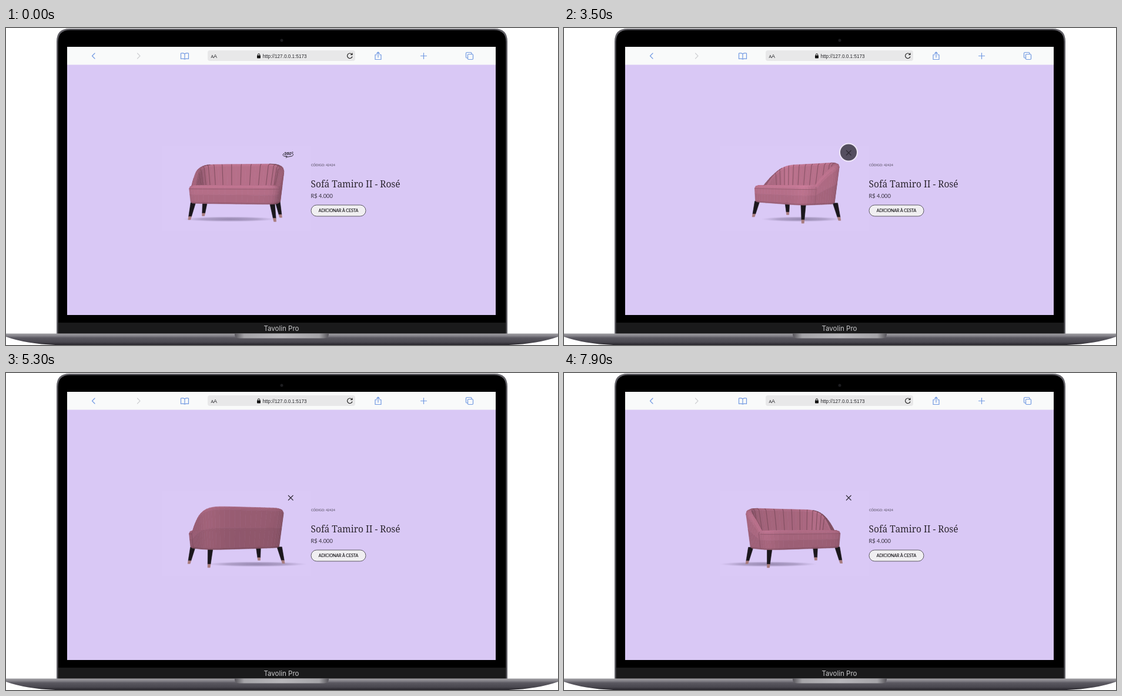
Animation of 939x539 px, one loop 8 s. Source, as an HTML page with a canvas:

```html
<!DOCTYPE html>
<html lang="pt-BR">
<head>
<meta charset="utf-8">
<title>Sofá 360°</title>
<style>
html, body { margin: 0; width: 100%; height: 100%; overflow: hidden; background: #fff; }
svg, canvas { position: absolute; left: 0; top: 0; width: 939px; height: 539px; }
.blue { fill: none; stroke: #7199e2; stroke-width: 1.2; stroke-linecap: round; stroke-linejoin: round; }
.sans { font-family: "Liberation Sans", sans-serif; }
.lato { font-family: Lato, sans-serif; }
</style>
</head>
<body>
<svg viewBox="0 0 939 539">
  <defs>
    <linearGradient id="base" x1="0" y1="0" x2="0" y2="1">
      <stop offset="0" stop-color="#a09fa3"/><stop offset=".2" stop-color="#85838a"/>
      <stop offset=".38" stop-color="#5a5860"/><stop offset=".75" stop-color="#49474f"/>
      <stop offset="1" stop-color="#252329"/>
    </linearGradient>
    <linearGradient id="notch">
      <stop offset="0" stop-color="#56545a"/><stop offset=".1" stop-color="#a5a4a8"/>
      <stop offset=".5" stop-color="#b7b6ba"/><stop offset=".9" stop-color="#a5a4a8"/>
      <stop offset="1" stop-color="#56545a"/>
    </linearGradient>
  </defs>

  <path d="M86 520V23Q86 1 108 1H831Q853 1 853 23V520Z" fill="#626167"/>
  <path d="M88.500 520V24Q88.500 3.500 109 3.500H830Q850.500 3.500 850.500 24V520Z" fill="#000"/>
  <rect x="89" y="501" width="761" height="19" fill="#1a1a1b"/>
  <circle cx="469" cy="21" r="2.500" fill="#1d1d20"/>
  <text x="468.500" y="515" text-anchor="middle" font-size="11.500" fill="#c9c9cb" font-family="Inter, sans-serif">Tavolin Pro</text>
  <path d="M0 519.500H939V525Q905 537 855 539H84Q34 537 0 525Z" fill="url(#base)"/>
  <path d="M389 519.500H549V521Q549 527.500 541 527.500H397Q389 527.500 389 521Z" fill="url(#notch)"/>

  <rect x="104" y="32" width="729" height="456" fill="#d9c8f5"/>
  <rect x="265" y="200" width="254" height="146" fill="#dac9f6"/>
  <rect x="104" y="32" width="729" height="30.500" fill="#f9fafa"/>
  <rect x="343" y="38" width="251" height="18" rx="4" fill="#e8e8e9"/>

  <g class="blue">
    <path d="M151 43L146.500 47.500L151 52"/>
    <path d="M223.500 43L228 47.500L223.500 52" stroke="#d0d0d3"/>
    <path d="M304 44Q301 42 297.500 43V52.500Q301 51.500 304 53Q307 51.500 310.500 52.500V43Q307 42 304 44V53"/>
    <path d="M630.500 45.500H628V53.500H638V45.500H635.500M633 50V41M630.500 43.500L633 41L635.500 43.500"/>
    <path d="M705.500 47.500H715.500M710.500 42.500V52.500"/>
    <rect x="785.500" y="44.500" width="9" height="9" rx="1.500"/>
    <path d="M785.500 51H784Q782.500 51 782.500 49.500V43Q782.500 41.500 784 41.500H790.500Q792 41.500 792 43V44.500"/>
  </g>

  <g class="sans" fill="#2a2a2e">
    <text x="348.500" y="51" font-size="7">A</text>
    <text x="353" y="51" font-size="9">A</text>
    <text x="436.500" y="51" font-size="8.200">http://127.0.0.1:5173</text>
    <rect x="427" y="46.500" width="6" height="5" rx=".8" fill="#111"/>
    <path d="M428.300 47V45.500A1.700 1.700 0 0 1 431.700 45.500V47" fill="none" stroke="#111"/>
  </g>
  <path d="M588.500 45A4.300 4.300 0 1 0 589 48.500M589 42.500V45.500H586" fill="none" stroke="#222" stroke-width="1.200"/>

  <text x="519" y="235" class="lato" font-size="5.500" fill="#4b4455">CÓDIGO: 42424</text>
  <text x="518.500" y="271" font-family="Noto Serif, serif" font-weight="500" font-size="15.500" fill="#2c2630">Sofá Tamiro II - Rosé</text>
  <text x="518.500" y="289" class="lato" font-size="9.300" fill="#37313f">R$ 4.000</text>
  <rect x="519" y="301" width="93" height="19" rx="9.500" fill="#f0eff1" stroke="#5d5964"/>
  <text x="565.500" y="313" text-anchor="middle" class="lato" font-size="7" fill="#17151a" stroke="#17151a" stroke-width=".15">ADICIONAR À CESTA</text>

  <g id="disc">
    <circle cx="484" cy="211.500" r="15" fill="#544e5f" stroke="#f0e9fb" stroke-width="2"/>
  </g>
  <g id="spin" fill="none" stroke="#2b2731">
    <text x="473" y="216" class="sans" font-size="7.500" font-weight="bold" font-style="italic" fill="#2b2731" stroke="none">360°</text>
    <path d="M473.500 213Q469 215.500 472.500 217.700Q479 220.500 486 218Q491 215.500 486.500 213M476 217L478.500 219L476 221"/>
  </g>
  <path id="cross" d="M480 208L488.500 216.500M488.500 208L480 216.500" stroke="#2c2833" stroke-width="1.100"/>
</svg>
<canvas width="939" height="539"></canvas>

<script>
const LOOP = 8000, CX = 392, HORIZON = 261, DIST = 700;
const BASE = 36, SEAT = 7, TOP = -31, FLOOR = 63;
const SIDE = 16, N = SIDE * 4;
const ctx = document.querySelector('canvas').getContext('2d');
const $ = id => document.getElementById(id);

// time, turn in degrees, brightness, shadow left, shadow right
const KEYS = [
  [2900, 13, .96, 300, 460],
  [4000, 86, 1.04, 365, 482],
  [4700, 124, .96, 350, 512],
  [5000, 139.5, .9, 345, 512],
  [5100, 139.5, .9, 345, 512],
  [6000, 186, .72, 328, 510],
  [6800, 275, .8, 283, 422],
  [7200, 296, .85, 276, 426],
  [7300, 296, .85, 276, 426],
  [7900, 328, .94, 265, 430]
];

function pose(t) {
  const i = KEYS.findIndex(k => k[0] >= t);
  if (i < 0) return KEYS[KEYS.length - 1];
  if (i === 0) return KEYS[0];
  const a = KEYS[i - 1], b = KEYS[i], f = (t - a[0]) / (b[0] - a[0]);
  return a.map((v, j) => v + (b[j] - v) * f);
}

// Rounded square outline, evenly spaced
const outline = Array.from({ length: N }, (_, i) => {
  const f = (i % SIDE) / SIDE * 2 - 1;
  const [x, z] = [[1, f], [-f, 1], [-1, -f], [f, -1]][i / SIDE | 0];
  const n = z > 0 ? 4 : 6;
  const r = (Math.abs(x) ** n + Math.abs(z) ** n) ** (-1 / n);
  return [x * r, z * r];
});

// Height of the arm and back along the outline
function crest(z) {
  const t = Math.min(1, Math.max(0, (z * 45 + 17) / 60));
  return SEAT + (TOP - SEAT) * (1 - (1 - t) ** 1.4);
}

function shellPoint([qx, qz], y, inset) {
  const k = (BASE - y) / (BASE - TOP);
  const depth = qz > 0 ? 41 + 7 * k : 42;
  return [qx * (73 + 8 * k - inset), y, qz * (depth - inset)];
}

// Cross section of the shell, from the outer bottom to the seat
const RINGS = [
  [() => BASE, 2], [() => BASE - 2, 0], [c => (BASE + c) / 2, 0],
  [c => c + 5, 0], [c => c + 1.5, 1.5], [c => c, 5],
  [c => c, 8], [c => Math.min(SEAT, c + 3), 10], [() => SEAT, 11]
];
const mesh = RINGS.map(([h, inset]) =>
  outline.map(q => shellPoint(q, h(crest(q[1])), inset)));

const tint = b => `rgb(${[190, 116, 143].map(c => Math.min(255, c * b) | 0)})`;

function trace(pts) {
  ctx.beginPath();
  pts.forEach(p => ctx.lineTo(p[0], p[1]));
}

function fill(pts, color) {
  trace(pts);
  ctx.closePath();
  ctx.fillStyle = ctx.strokeStyle = color;
  ctx.lineWidth = .6;
  ctx.fill();
  ctx.stroke();
}

const visible = (a, b, c, d) =>
  (c[0] - a[0]) * (d[1] - b[1]) - (c[1] - a[1]) * (d[0] - b[0]) < 0;

function drawShadow(left, right) {
  const mid = (left + right) / 2;
  ctx.save();
  ctx.translate(mid, 325);
  ctx.scale((right - left) / 2, 4.5);
  const g = ctx.createRadialGradient(0, 0, 0, 0, 0, 1);
  g.addColorStop(0, 'rgba(112,98,135,.65)');
  g.addColorStop(.6, 'rgba(125,112,148,.45)');
  g.addColorStop(1, 'rgba(150,135,175,0)');
  ctx.fillStyle = g;
  ctx.beginPath();
  ctx.arc(0, 0, 1, 0, 7);
  ctx.fill();
  ctx.restore();
}

function drawLeg(sx, sz, project) {
  const at = f => project([sx * (66 + 5 * f), BASE - 1 + (FLOOR - BASE + 1) * f, sz * (33 + 5 * f)]);
  const part = (f, g, color) => {
    const a = at(f), b = at(g), w = 4.2 - 2.2 * f, v = 4.2 - 2.2 * g;
    fill([[a[0] - w, a[1]], [a[0] + w, a[1]], [b[0] + v, b[1]], [b[0] - v, b[1]]], color);
  };
  part(0, .82, '#1b171c');
  part(.82, 1, '#a87c7e');
}

function drawSofa([, turn, bright, left, right]) {
  const a = turn * Math.PI / 180, cos = Math.cos(a), sin = Math.sin(a);
  const project = ([x, y, z]) => {
    const vx = x * cos + z * sin, vz = z * cos - x * sin, s = DIST / (DIST + vz);
    return [CX + vx * s, HORIZON + y * s, vx, vz];
  };
  ctx.clearRect(0, 0, 939, 539);
  ctx.lineJoin = 'round';
  drawShadow(left, right);
  [[-1, -1], [-1, 1], [1, -1], [1, 1]]
    .sort((p, q) => project([q[0] * 70, 0, q[1] * 38])[3] - project([p[0] * 70, 0, p[1] * 38])[3])
    .forEach(([x, z]) => drawLeg(x, z, project));

  const rings = mesh.map(r => r.map(project));
  const quad = (i, j) => {
    const k = (j + 1) % N;
    return [rings[i][j], rings[i][k], rings[i + 1][k], rings[i + 1][j]];
  };
  const band = i => {
    const inner = i > 5 ? -1 : 1;
    const quads = outline.map((_, j) => quad(i, j)).filter(q => visible(...q));
    quads.sort((p, q) => q[0][3] - p[0][3]).forEach(q => {
      const dx = q[1][2] - q[0][2], dz = q[1][3] - q[0][3];
      const lit = inner * (dx * .95 - dz * .3) / Math.hypot(dx, dz);
      const shade = [.84, .94, .99, 1.04, 1.08, 1.07, 1.04, 1][i];
      fill(q, tint(bright * shade * (.8 + .2 * lit)));
    });
  };

  band(7);
  band(6);
  // Stitched channels on the inside
  ctx.strokeStyle = tint(bright * .72);
  ctx.lineWidth = 1.1;
  for (let j = 10; j <= 38; j += 2) {
    if (!visible(...quad(7, j))) continue;
    trace([rings[6][j], rings[7][j], rings[8][j]]);
    ctx.stroke();
  }
  fill(rings[8], tint(bright * 1.03));
  for (let i = 5; i >= 0; i--) band(i);

  // Piping under the seat edge
  ctx.strokeStyle = tint(bright * .76);
  ctx.lineWidth = .8;
  for (let j = 0; j < N; j++) {
    if (outline[j][1] > -.4 || !visible(...quad(2, j))) continue;
    trace([rings[3][j], rings[3][(j + 1) % N]]);
    ctx.stroke();
  }
  // Seam between arm and seat block
  [SIDE * 2 + 11, 5].forEach(j => {
    if (!visible(...quad(2, j))) return;
    trace(rings.slice(0, 5).map(r => r[j]));
    ctx.stroke();
  });
}

function frame() {
  const t = Math.floor(performance.now() % LOOP / 100) * 100;
  const opened = t >= 1800;
  $('disc').style.opacity = t < 1300 || t >= 5200 ? 0 : t < 1400 ? .5 : 1;
  $('spin').style.display = opened ? 'none' : '';
  $('cross').style.display = opened ? '' : 'none';
  drawSofa(pose(t));
  requestAnimationFrame(frame);
}
frame();
</script>
</body>
</html>
```
